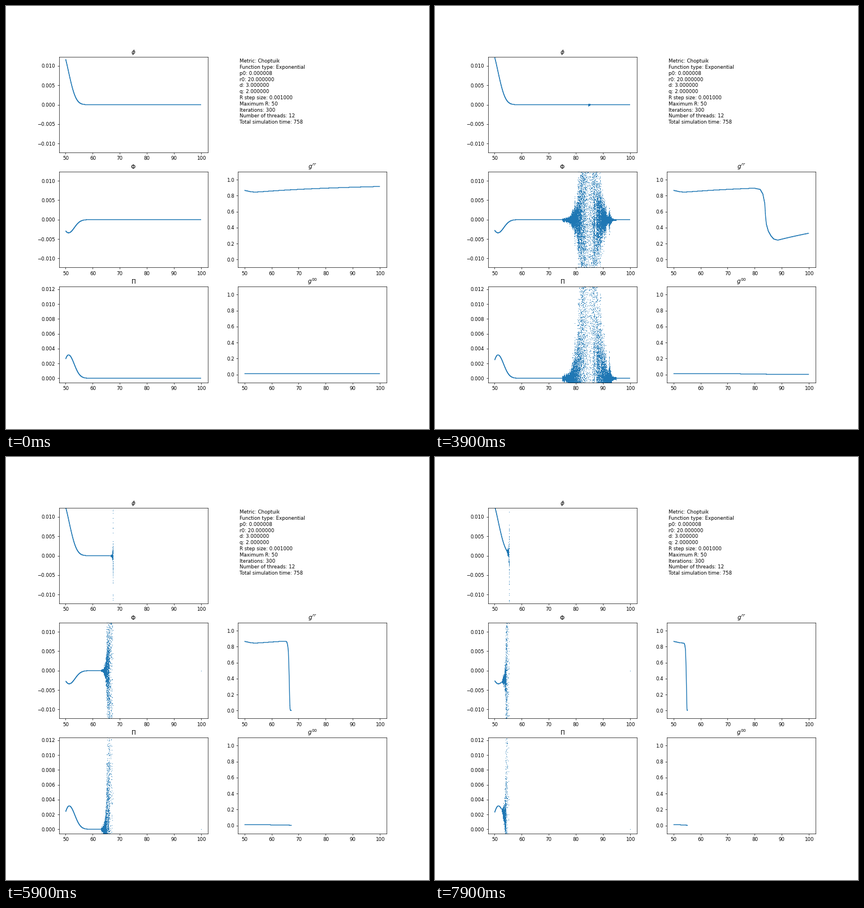
A matplotlib script for the animation above (8 s loop, 748x748 px).

```python
import matplotlib.pyplot as plt
import numpy as np
from matplotlib.animation import FuncAnimation

FRAMES, STEP = 80, 100
SIZE = 748
PX = 12 * 72 / SIZE         # points per pixel
GRAIN = 1 / 1200            # vertical rounding of the curves, in stage heights
CALM = 5e-5                 # noise below this is drawn as a clean line

LINE = dict(lw=1.4 * PX, color="C0", solid_capstyle="butt")
DOT = dict(ls="none", marker="o", ms=0.9 * PX, mew=0, color="C0")
R = np.linspace(50, 100, 50001)

INFO = """Metric: Choptuik
Function type: Exponential
p0: 0.000008
r0: 20.000000
d: 3.000000
q: 2.000000
R step size: 0.001000
Maximum R: 50
Iterations: 300
Number of threads: 12
Total simulation time: 758""".split("\n")

# Seconds at which the blow-up front is pinned, and its radius there.
FRONT_T = [4.0, 4.5, 4.7, 5.4, 5.5, 5.8, 6.3, 7.2, 7.9]
FRONT_R = [84, 78.1, 76.2, 72.2, 71.6, 68.5, 63.2, 58.1, 55.3]
SHAPE_T = [4.0, 4.7, 5.5, 6.3, 7.9]
SHAPE_GAP = [1.2, 1.0, 0.5, 1.2, 0.55]
SHAPE_STEP = [8.5, 8.4, 9.6, 6.1, 2.7]
# Share of the runaway mass inside a radius, just before the front forms.
MASS_R = [78, 80, 82, 83, 83.7, 84, 84.3, 85, 86, 87, 88.5]
MASS_S = [0, 0.002, 0.025, 0.11, 0.28, 0.52, 0.66, 0.79, 0.89, 0.96, 1]


def bump(height, centre, left, right):
    width = np.where(R < centre, left, right)
    return height * np.exp(-((R - centre) / width) ** 2 / 2)


def ragged(rng, cell, spread):
    """Random gain along R, smooth within one cell."""
    knots = np.arange(50, 100 + cell, cell)
    return np.interp(R, knots, rng.lognormal(0, spread, knots.size))


def noise_behind(t, front, gap):
    sd = 0.006 * np.exp(np.minimum((R - front + 2.2 * gap) / (0.6 * gap), 5))
    if t < 5.85:
        growth = np.exp((t - 5.5) / 0.12)
        sd += 0.00022 * growth * np.exp(-((R - 66.4) / 3.5) ** 4)
    return sd


def fields(i):
    """Front radius, then (curve, noise level) for each panel."""
    t = i * STEP / 1000
    rng = np.random.default_rng(100 + i)
    centre = 51.05 + 0.04 * t
    Phi = -bump(0.0034, centre, 1.85, 2.15)
    Pi = bump(0.00315, centre, 1.7, 2.1)
    phi = -np.cumsum(Phi[::-1])[::-1]
    phi *= (0.0117 + 0.00013 * t) / phi[0]
    mass = 8.5 - 1.75 * np.exp(-((R - 50) / 2.3) ** 1.5)
    g00 = np.full(R.size, 0.009)
    quiet = np.zeros(R.size)

    if t < 3.95:
        front = R[-1]
        gain = 3.3 ** (10 * (t - 3.9))
        sd = 0.065 * gain * np.exp(-0.72 * abs(R - 84.9))
        phi_sd = 0.001 * sd
        mass += 58.5 * gain ** 2 * np.interp(R, MASS_R, MASS_S)
        grr = 1 - mass / R
        if t > 3.85:
            g00[R > 74.7] = 0.004
            g00[R > 84.3] = 0
    else:
        front = np.interp(t, FRONT_T, FRONT_R)
        gap = np.interp(t, SHAPE_T, SHAPE_GAP)
        sd = noise_behind(t, front, gap)
        depth = np.maximum(front - R, 0)
        phi_sd = 0.03 * np.exp(-depth / 0.03) + 0.0005 * np.exp(-depth / 0.4)
        wobble = 0.03 * np.log(ragged(rng, 0.2, 1))
        fall = (R + wobble - front + gap) / (0.25 * gap + 0.02)
        grr = (1 - mass / R) * np.exp(-np.exp(np.minimum(fall, 5)))
        g00[R > front - np.interp(t, SHAPE_T, SHAPE_STEP)] = 0.004
        g00[R > front - gap] = 0

    return rng, front, [(phi, phi_sd), (Phi, sd), (grr, quiet), (Pi, sd), (g00, quiet)]


fig, axes = plt.subplots(3, 2, figsize=(12, 12), dpi=SIZE / 12)
fig.subplots_adjust(left=0.125, right=0.9, bottom=0.11, top=0.88, wspace=0.2, hspace=0.2)


def panel(ax, title, ylim, ticks):
    ax.set_title(title)
    ax.set_xlim(47.5, 102.5)
    ax.set_xticks(range(50, 101, 10))
    ax.set_ylim(*ylim)
    ax.set_yticks(ticks)
    return ax, ax.plot([], [], **LINE)[0], ax.plot([], [], **DOT)[0]


def grainy(ax, values):
    """Round values to the vertical grain of the stage."""
    box, (low, high) = ax.get_position(), ax.get_ylim()
    scale = box.height / (high - low)
    y = box.y0 + (values - low) * scale
    return low + (np.round(y / GRAIN) * GRAIN - box.y0) / scale


wave = (-0.01233, 0.01235), np.arange(-2, 3) * 0.005
unit = (-0.1, 1.1), np.arange(6) * 0.2
panels = [
    panel(axes[0, 0], r"$\phi$", *wave),
    panel(axes[1, 0], r"$\Phi$", *wave),
    panel(axes[1, 1], r"$g^{rr}$", *unit),
    panel(axes[2, 0], r"$\Pi$", (-0.00057, 0.01235), np.arange(7) * 0.002),
    panel(axes[2, 1], r"$g^{00}$", *unit),
]
edge_dots = [axes[row, 0].plot([100], [0], **DOT)[0] for row in (1, 2)]

axes[0, 1].axis("off")
for row, line in enumerate(INFO):
    fig.text(412.5 / SIZE, 1 - (100.2 + 10.8 * row) / SIZE, line, va="baseline")


def draw(i):
    rng, front, curves = fields(i)
    inside = R <= front
    gain = ragged(rng, 0.25, 0.45)
    for (ax, line, dots), (curve, sd) in zip(panels, curves):
        calm = inside & (sd < CALM)
        clean = np.where(calm, grainy(ax, curve), np.nan)
        line.set_data(R[::5], clean[::5])
        noisy = inside & ~calm
        spray = rng.standard_normal(noisy.sum()) * (sd * gain)[noisy]
        dots.set_data(R[noisy], curve[noisy] + spray)
    for dot in edge_dots:
        dot.set_visible(front < R[-1])


anim = FuncAnimation(fig, draw, frames=FRAMES, interval=STEP, repeat=True, repeat_delay=0)
plt.show()
```
